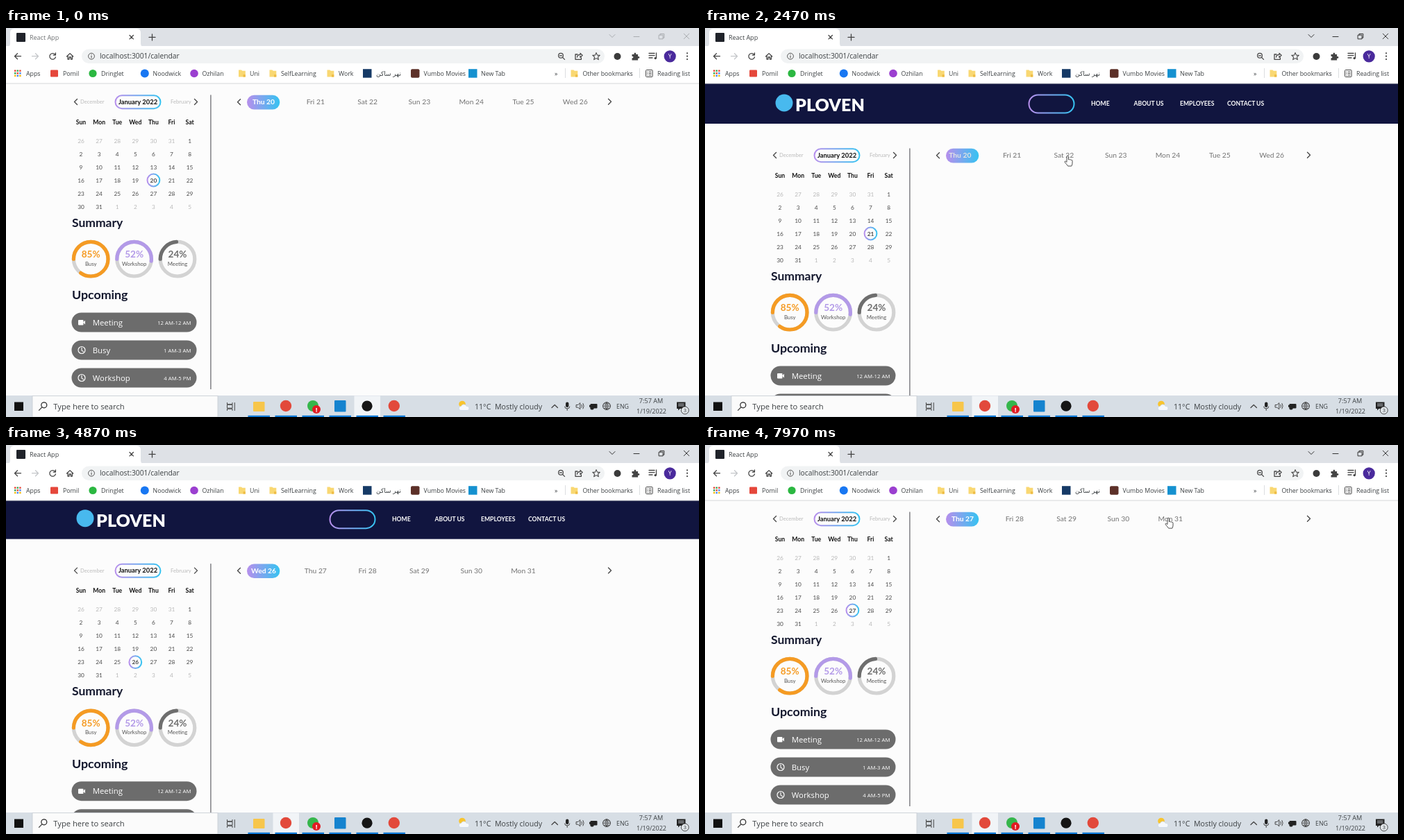
Write an HTML page that moves like this. It is 998 by 561 pixels and loops after 8 s.

```html
<!DOCTYPE html>
<html lang="en">
<head>
<meta charset="utf-8">
<title>Calendar</title>
<style>
  html, body { margin: 0; width: 100%; height: 100%; overflow: hidden; background: #fcfcfc; }
  svg { display: block; width: 100vw; height: 100vh; }
  text { white-space: pre; }
  .ui { font-family: "Open Sans", "Noto Sans", sans-serif; fill: #3c4043; }
  .app { font-family: Lato, "Open Sans", sans-serif; fill: #555; }
  .mid { text-anchor: middle; }
  .end { text-anchor: end; }
  .bold { font-weight: 700; }
  .line { fill: none; stroke: #444; stroke-width: 1.3; }
  .round { stroke-linecap: round; stroke-linejoin: round; }
</style>
</head>
<body>
<svg id="stage" viewBox="0 0 998 561">
  <defs>
    <linearGradient id="grad">
      <stop offset="0" stop-color="#b78fec"/>
      <stop offset="1" stop-color="#35c3f1"/>
    </linearGradient>
    <clipPath id="stripClip"><rect x="344" y="168" width="518" height="32"/></clipPath>
  </defs>
  <rect width="998" height="561" fill="#fcfcfc"/>
  <g id="page" class="app"></g>
  <g id="browser" class="ui"></g>
  <g id="taskbar" class="ui"></g>
  <g id="cursor" stroke="#222" stroke-width=".8" stroke-linejoin="round" fill="#fff">
    <path id="arrow" d="M0 0V12L2.8 9.4 4.6 13.5 6.3 12.8 4.6 8.8H8.4Z"/>
    <path id="hand" d="M-1 8V1Q-1-.4 .2-.4T1.4 1V5.2Q2.6 4.4 3.6 5.5 4.8 4.8 5.6 6 7 5.6 7 7.2V10.5Q7 12.5 5.8 14.6H.6Q-.6 12.6-3.6 9.4-4.4 8-3.4 7.6-2.4 7.2-1 9Z"/>
  </g>
</svg>
<script>
const $ = id => document.getElementById(id);
const text = (x, y, s, size, cls = '', attrs = '') =>
  `<text x="${x}" y="${y}" font-size="${size}" class="${cls}" ${attrs}>${s}</text>`;
const rect = (x, y, w, h, fill, r = 0, attrs = '') =>
  `<rect x="${x}" y="${y}" width="${w}" height="${h}" rx="${r}" fill="${fill}" ${attrs}/>`;
const disc = (x, y, r, fill, attrs = '') =>
  `<circle cx="${x}" cy="${y}" r="${r}" fill="${fill}" ${attrs}/>`;
const line = (d, attrs = '') => `<path class="line round" d="${d}" ${attrs}/>`;
const folder = x =>
  `<path d="M${x} 60.5h4l1.2 1.3h4.6v8.8h-9.8z" fill="#f9d872"/><path d="M${x + 6.5} 70.6v-3.4h3.3v3.4z" fill="#eebc45"/>`;

const GRAD = 'url(#grad)';
const outline = `stroke="${GRAD}" stroke-width="2"`;
const SLOT = 371, STEP = 74.8;
const cellX = i => 108 + i % 7 * 26.1;
const cellY = i => 239.5 + Math.floor(i / 7) * 19;

function buildPage() {
  const dark = 'fill="#111"';
  let s = rect(0, 80, 998, 58, '#11153f') + disc(114, 108, 12.5, '#48b9ee');
  s += text(130, 120.3, 'PLOVEN', 25, '', 'font-weight="900" fill="#fff"');
  s += rect(466.5, 96.5, 65, 26, 'none', 13, outline);
  [['HOME', 556], ['ABOUT US', 617.5], ['EMPLOYEES', 684], ['CONTACT US', 752]].forEach(([n, x]) =>
    s += text(x, 112, n, 8.6, 'bold', 'fill="#fff"'));

  // month picker and calendar
  const nav = 'stroke="#111" stroke-width="1.5"';
  s += line('M102.5 179.5l-4 4 4 4M271.5 179.5l4 4-4 4', nav);
  s += line('M337.5 179.7l-4 4 4 4M867.5 179.3l4 4-4 4', nav);
  s += text(107, 186, 'December', 7.6, '', 'fill="#bbb"') + text(237, 186, 'February', 7.6, '', 'fill="#bbb"');
  s += rect(157.5, 174.2, 65, 19, 'none', 9.5, outline);
  s += text(190, 186.6, 'January 2022', 9.4, 'mid bold', dark);
  'Sun Mon Tue Wed Thu Fri Sat'.split(' ').forEach((d, i) =>
    s += text(cellX(i), 215.5, d, 8.6, 'mid bold', dark));
  for (let i = 0; i < 42; i++) {
    const inMonth = i > 5 && i < 37;
    const day = inMonth ? i - 5 : i < 6 ? 26 + i : i - 36;
    s += text(cellX(i), cellY(i) + 3, day, 8.3, 'mid cell', `fill="${inMonth ? '#4a4a4a' : '#b8b8b8'}"`);
  }
  s += `<circle id="ring" r="8.9" fill="none" ${outline} stroke-width="1.8"/>`;

  // summary rings
  s += text(95, 363.8, 'Summary', 17.5, 'bold', 'fill="#14182e"');
  [['Busy', 85, '#f59b23'], ['Workshop', 52, '#b39ae8'], ['Meeting', 24, '#6e6e6e']].forEach(([name, pct, col], i) => {
    const x = 122.2 + i * 62.4, y = 410.2;
    s += disc(x, y, 24.8, 'none', 'stroke="#d3d3d3" stroke-width="5.2"');
    s += disc(x, y, 24.8, 'none', `stroke="${col}" stroke-width="5.2" stroke-linecap="round" pathLength="100" stroke-dasharray="${pct} 100" transform="rotate(180 ${x} ${y})"`);
    s += text(x, 408.2, pct + '%', 13.6, 'mid bold', `fill="${col}"`) + text(x, 419.6, name, 7.8, 'mid');
  });

  // upcoming events
  s += text(95, 468.4, 'Upcoming', 17.8, 'bold', 'fill="#14182e"');
  [['Meeting', '12 AM-12 AM'], ['Busy', '1 AM-3 AM'], ['Workshop', '4 AM-5 PM']].forEach(([name, span], i) => {
    const y = 487.5 + i * 40;
    s += rect(94.5, y, 180, 28, '#6c6c6c', 14);
    s += i
      ? line(`M109 ${y + 10.5}v4l2.5 1.6`, 'stroke="#fff" style="stroke:#fff;stroke-width:1.1"') + disc(109, y + 14, 5, 'none', 'stroke="#fff" stroke-width="1.2"')
      : rect(104, y + 10.5, 7.5, 7.4, '#fff', 1) + `<path d="M111 ${y + 14}l3-2.8v5.8z" fill="#fff"/>`;
    s += `<g class="ui">${text(124.7, y + 18, name, 11.4, '', 'fill="#fff"')}${text(266.5, y + 17.3, span, 7.8, 'end', 'fill="#fff"')}</g>`;
  });
  s += rect(294.2, 173.5, 1.4, 424.5, '#77777c');

  // day strip
  s += rect(347, 173.8, 47.3, 20.6, GRAD, 10.3) + '<g clip-path="url(#stripClip)"><g id="strip">';
  const names = 'Sun Mon Tue Wed Thu Fri Sat'.split(' ');
  for (let i = 0; i < 12; i++)
    s += text(SLOT + i * STEP, 187.4, `${names[(i + 4) % 7]} ${20 + i}`, 10.3, 'mid day');
  $('page').innerHTML = s + '</g></g>';
}

function buildBrowser() {
  let s = rect(0, 0, 998, 27, '#dee1e6');
  s += '<path d="M2 27Q6 27 6 22V7Q6 1 12 1H188Q194 1 194 7V22Q194 27 198 27Z" fill="#fff"/>' + rect(0, 26, 998, 54, '#fff');
  s += rect(0, 79.5, 998, 1, '#d5d7da') + rect(15, 7, 13, 13, '#20232a', 1);
  s += `<g class="title">${text(34, 16.8, 'React App', 9)}</g>`;
  s += line('M178 10.5l5.4 5.4m0-5.4l-5.4 5.4M206 13.4h9M210.5 8.9v9');
  s += `<g id="controls">${line('M869 9.5l4 4 4-4M904 12.5h8M976.3 8.2l7.4 7.4m0-7.4l-7.4 7.4M940.5 10.2h5.6v5.6h-5.6zM942 10V8.4h5.8v5.8h-1.5', 'style="stroke:inherit;stroke-width:1"')}</g>`;

  // toolbar
  s += line('M21.5 40.7h-9m4-4l-4 4 4 4');
  s += line('M37.5 40.7h9m-4-4l4 4-4 4', 'style="stroke:#c4c6c9"');
  s += line('M70.6 38.2a4.3 4.3 0 1 0 .8 3.6M71.4 35.9v3.2h-3.2M87.5 41l4.6-4.4 4.6 4.4M89 40v5h2v-3h2.4v3h2v-5');
  s += rect(109, 30.5, 753, 20.5, '#f1f3f4', 10.2) + disc(123, 40.7, 4.4, 'none', 'stroke="#555" stroke-width="1"') + line('M123 40.3v2.6M123 38.5v.1', 'style="stroke-width:1"');
  s += text(135, 44.4, 'localhost:3001/calendar', 10.3);
  s += disc(799, 39.8, 3.4, 'none', 'stroke="#444" stroke-width="1.2"') + line('M801.5 42.4l3 3M797.4 39.8h3.2M823 38h-3v7.3h8.4V43M822.6 42q.4-3.6 4.4-3.6v-2l3.2 3-3.2 3v-2');
  s += line('M850 35.6l1.5 3.5 3.7.3-2.8 2.5.9 3.7-3.3-2-3.3 2 .9-3.7-2.8-2.5 3.7-.3z', 'style="stroke-width:1.1"');
  s += disc(880.5, 41, 5, '#3b3b3b');
  s += '<path d="M901.5 38h3q-.4-2.5 1.4-2.5t1.4 2.5h2.8v3q2.3-.3 2.3 1.4t-2.3 1.3v2.8h-8.6v-2.9q2-.2 2-1.5t-2-1.4z" fill="#444"/>';
  s += line('M926 36.5h8M926 39.7h8M926 43h5M936.5 36v7.2') + disc(935.2, 43.6, 1.7, '#444');
  s += disc(956.2, 40.8, 8.6, '#4a2a9c') + text(956.2, 44, 'Y', 8.6, 'mid', 'fill="#fff"');
  [36.3, 40.7, 45.1].forEach(y => s += disc(981, y, 1.1, '#444'));

  // bookmarks
  const dots = ['#ea4335', '#fbbc04', '#34a853', '#4285f4'];
  for (let i = 0; i < 9; i++) s += rect(12 + i % 3 * 3.6, 60.5 + Math.floor(i / 3) * 3.6, 2.4, 2.4, dots[(i * 2 + (i > 4)) % 4]);
  s += rect(64, 60.5, 11, 10, '#e5473b', 1) + disc(125, 65.5, 5.6, '#2bb741') + disc(199.8, 65.5, 6, '#1877f2') + disc(271, 65.5, 5.8, '#9b3fd0');
  s += rect(514, 59.2, 12.5, 12.5, '#163a66') + rect(583, 59.2, 12.5, 12.5, '#5c3028', 2) + rect(666, 59.2, 12.5, 12.5, '#1591d0');
  [335, 379.5, 462.5, 813.5].forEach(x => s += folder(x));
  [['Apps', 29], ['Pomil', 82], ['Dringlet', 137], ['Noodwick', 211.5], ['Ozhilan', 282.5], ['Uni', 351], ['SelfLearning', 396],
   ['Work', 479], ['Vumbo Movies', 601.5], ['New Tab', 684], ['»', 790], ['Other bookmarks', 830.5], ['Reading list', 938]]
    .forEach(([n, x]) => s += text(x, 68.8, n, 8.8));
  s += text(551, 68.8, 'نهر ساكن', 9, 'mid', 'style="font-family:\'DejaVu Sans\',sans-serif"');
  s += rect(805, 58, 1, 14, '#dcdee0') + rect(912, 58, 1, 14, '#dcdee0');
  s += rect(921.5, 60.5, 9.6, 10, 'none', 1, 'stroke="#444"') + line('M923.5 63.2h.4M923.5 65.6h.4M923.5 68h.4M926 63.2h3M926 65.6h3M926 68h3', 'style="stroke-width:1"');
  $('browser').innerHTML = s;
}

function buildTaskbar() {
  let s = rect(0, 530, 998, 31, '#d7dee5') + rect(38, 530.5, 267, 30.5, '#fbfbfb', 0, 'stroke="#c9ced4" stroke-width=".8"');
  s += rect(12, 539.5, 13, 12.5, '#111') + disc(54.8, 543.8, 4, 'none', 'stroke="#222" stroke-width="1.2"') + line('M52 546.8l-4.5 4.6');
  s += text(68.3, 550.2, 'Type here to search', 11.2);
  s += line('M318.5 540.5v2.2h7.5v-2.2M318.5 551.5v-2.2h7.5v2.2M318.5 543.6v4.6h7.5v-4.6zM329.3 540.5v11', 'style="stroke-width:1"');
  s += '<g id="active">' + rect(0, 530.5, 37.5, 30, '#f1f4f7') + '</g>';
  for (let i = 0; i < 6; i++) s += rect(348.5 + i * 39, 558.8, 31.5, 2.2, '#0a78d4');
  s += rect(356, 539, 16.5, 14, '#f7c64b', 1) + disc(403, 545, 8.2, '#e2493b') + disc(442, 545, 8, '#35b64b');
  s += disc(447, 550, 6, '#e11b22') + text(447, 553.6, '!', 9.5, 'mid bold', 'fill="#fff"');
  s += rect(473, 537, 16.5, 16.5, '#1583cf', 1) + disc(520, 545.2, 7.6, '#151515') + disc(558.8, 545, 8.2, '#e2493b');

  // tray
  s += disc(657, 542.5, 4.8, '#f8c42d') + '<path d="M655 551.5a3 3 0 0 1 .4-6 4.2 4.2 0 0 1 7.8 0 3 3 0 0 1 1.4 6z" fill="#f5f8fc" stroke="#c1d0e2" stroke-width=".6"/>';
  s += text(675, 550, '11°C', 10.6) + text(704, 550, 'Mostly cloudy', 10.6);
  s += line('M786 547.5l4.2-4 4.2 4') + rect(806, 539.5, 4.4, 7.4, '#222', 2.2) + line('M804.6 546q0 3 3.6 3t3.6-3M808.2 549v2.5', 'style="stroke-width:1"');
  s += line('M821.5 543.5h2.3l3-2.8v9.2l-3-2.8h-2.3zM829 543.3q1.3 2 0 4M831 541.5q2.4 3.7 0 7.5', 'style="stroke-width:1"');
  s += rect(841.5, 542, 10, 6.5, '#222', 1) + rect(840, 543.7, 2, 3, '#222') + disc(844, 548, 2.6, '#222');
  s += disc(865, 545.2, 5.4, 'none', 'stroke="#333"') + line('M859.8 545.2h10.4M865 540v10.5M861 542h8M861 548.4h8M865 540q-4.4 5.2 0 10.5q4.4-5.3 0-10.5', 'style="stroke-width:.8"');
  s += text(888, 548.6, 'ENG', 8.8, 'mid') + text(929, 541.3, '7:57 AM', 9.1, 'mid') + text(929.5, 556, '1/19/2022', 9.1, 'mid');
  s += '<path d="M966 539.5h12.5v9.5h-8l-2.5 2.4V549h-2z" fill="#222"/>' + line('M968.5 542.3h7.5M968.5 544.8h7.5', 'style="stroke:#d7dee5;stroke-width:.9"');
  s += disc(977.8, 551.4, 5.4, '#e3e8ec', 'stroke="#222" stroke-width=".8"') + text(977.8, 554.4, '3', 8, 'mid');
  $('taskbar').innerHTML = s;
}

buildPage();
buildBrowser();
buildTaskbar();
const cells = document.querySelectorAll('.cell');
const days = document.querySelectorAll('.day');

const LOOP = 8000, SLIDE = 500, ACTIVATE = 2380, MAX_SCROLL = 77;
const slides = [[2438, 1], [3200, 3], [4303, 6], [7380, 7]];   // start, day index
const tracks = [                                              // time, x, y
  [[300, 498, 470], [830, 409, 215], [900, 399, 223], [1100, 399, 223], [1250, 396, 228], [1700, 396, 228], [2150, 446, 186],
   [2350, 446, 186], [2470, 522, 184.5], [3600, 522, 187], [3900, 596, 187], [4230, 599, 189], [4370, 608, 218.5], [4850, 618, 245]],
  [[5600, 612, 230], [6600, 414, 114], [6830, 412, 111], [7120, 446, 107], [7350, 446, 107], [7970, 667, 105.5], [8001, 668, 105.5]]
];

const clamp = v => Math.min(1, Math.max(0, v));
const smooth = v => (v = clamp(v)) * v * (3 - 2 * v);
const bez = (u, a, b) => 3 * u * (1 - u) * ((1 - u) * a + u * b) + u * u * u;

// CSS "ease"
function ease(x) {
  let lo = 0, hi = 1;
  for (let i = 0; i < 20; i++) {
    const m = (lo + hi) / 2;
    if (bez(m, .25, .25) < x) lo = m; else hi = m;
  }
  return bez(lo, .1, 1);
}

function pointer(t) {
  const track = tracks.find(k => t >= k[0][0] && t < k[k.length - 1][0]);
  if (!track) return null;
  const i = track.findIndex(k => k[0] > t);
  const [t0, x0, y0] = track[i - 1], [t1, x1, y1] = track[i];
  const p = smooth((t - t0) / (t1 - t0));
  return [x0 + (x1 - x0) * p, y0 + (y1 - y0) * p];
}

function draw(t) {
  const scroll = MAX_SCROLL * (1 - smooth((t - 1424) / 200) + smooth((t - 4850) / 200));
  $('page').setAttribute('transform', `translate(0 ${-scroll})`);

  let from = 0, to = 0, p = 1;
  for (const [start, day] of slides) if (t >= start) {
    from = to; to = day; p = clamp((t - start) / SLIDE);
  }
  const shift = from + (to - from) * ease(p);
  $('strip').setAttribute('transform', `translate(${-shift * STEP} 0)`);
  const fade = clamp(p * 3);
  days.forEach((d, i) => {
    const lit = i === to ? fade : i === from ? 1 - fade : 0;
    const g = Math.round(115 + 140 * lit);
    d.style.fill = `rgb(${g},${g},${g})`;
    d.style.fontWeight = i === to || i === from && lit > .5 ? 700 : 400;
  });

  const sel = 25 + to;
  $('ring').setAttribute('cx', cellX(sel));
  $('ring').setAttribute('cy', cellY(sel));
  cells.forEach((c, i) => c.style.fontWeight = i === sel ? 700 : 400);

  const active = t >= ACTIVATE;
  $('controls').style.stroke = active ? '#333' : '#a9acb0';
  document.querySelector('.title').style.opacity = active ? 1 : .75;
  $('active').setAttribute('transform', `translate(${active ? 384.5 : 501.5} 0)`);

  const pos = pointer(t);
  $('cursor').style.display = pos ? '' : 'none';
  if (!pos) return;
  const [x, y] = pos;
  const slot = Math.round((x - SLOT) / STEP);
  const over = slot > 0 && Math.abs(x - SLOT - slot * STEP) < 19 && Math.abs(y - 184 + scroll) < 9;
  $('arrow').style.display = over ? 'none' : '';
  $('hand').style.display = over ? '' : 'none';
  $('cursor').setAttribute('transform', `translate(${x} ${y})`);
}

const began = performance.now();
(function tick() {
  draw((performance.now() - began) % LOOP);
  requestAnimationFrame(tick);
})();
</script>
</body>
</html>
```
